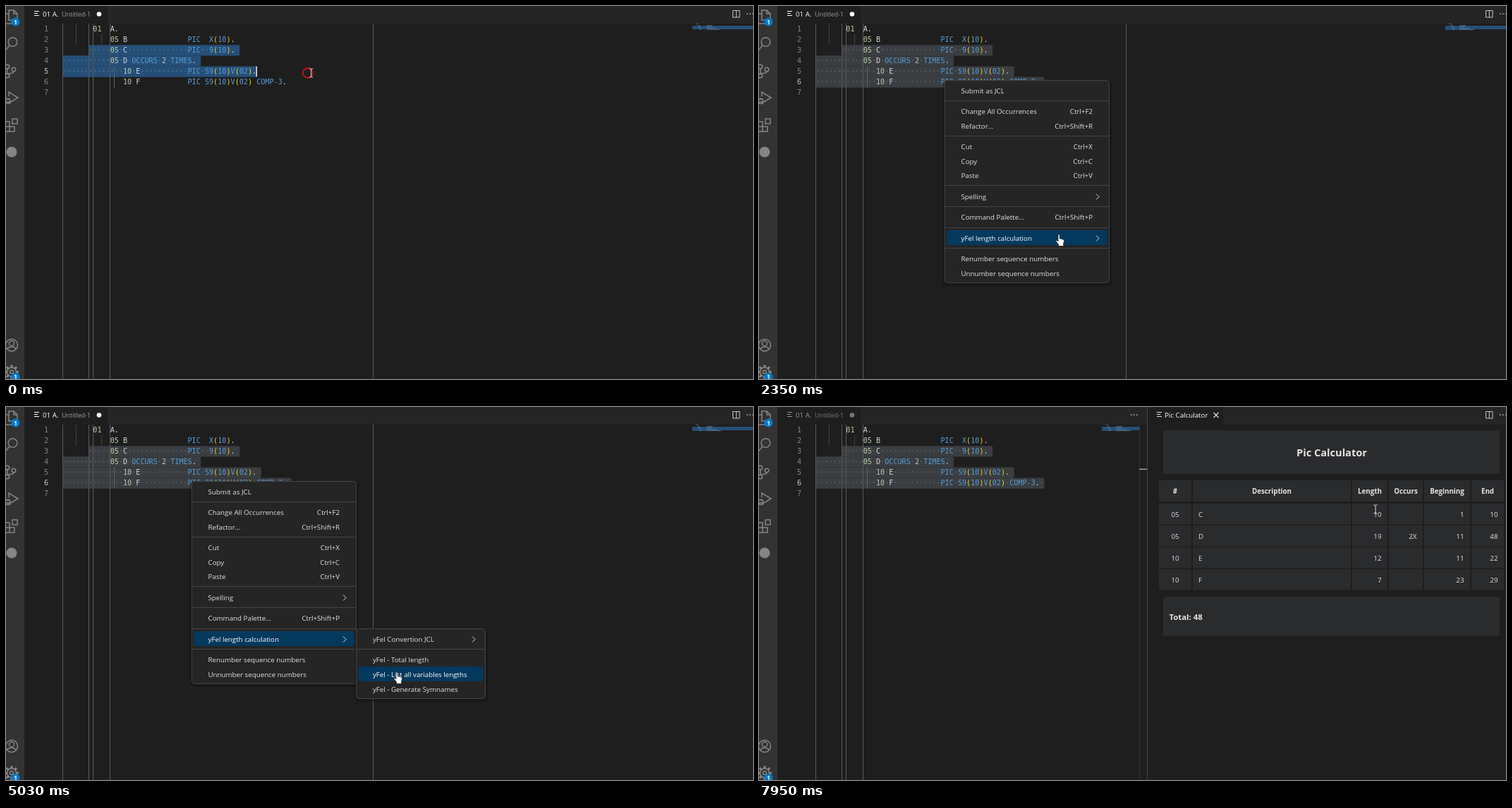
An HTML page for the animation above (8 s loop, 1059 by 529 pixels).

```html
<!DOCTYPE html>
<html lang="en">
<head>
<meta charset="utf-8">
<title>Editor length calculation</title>
<style>
html, body { margin: 0; width: 100%; height: 100%; overflow: hidden; background: #1e1e1e; }
svg { display: block; width: 100%; height: 100%; }
text { font: 9.75px "Open Sans", "Noto Sans", sans-serif; fill: #e2e2e2; white-space: pre; }
.code { font: 10.15px "DejaVu Sans Mono", monospace; fill: #d4d4d4; }
.row rect { fill: none; }
.row path { fill: none; stroke: #ddd; }
.on rect { fill: #04395e; }
.on text { fill: #fff; }
.icon { fill: none; stroke: #858585; stroke-width: 1.5; }
</style>
</head>
<body>
<svg id="stage" viewBox="0 0 1059 529"></svg>
<script>
const LOOP = 8000, X0 = 80.7, CH = 6.11, TOP = 25, LH = 15.1;
const stage = document.getElementById('stage');
const $ = id => document.getElementById(id);
const col = c => X0 + c * CH;
const lineY = n => TOP + (n - 1) * LH;

const rect = (x, y, x2, y2, fill, rx = 0, more = '') =>
  `<rect x="${x}" y="${y}" width="${x2 - x}" height="${y2 - y}" fill="${fill}" rx="${rx}" ${more}/>`;
const text = (x, mid, s, style = '', anchor = 'start', cls = '') =>
  `<text x="${x}" y="${Math.round(mid + 3.5)}" text-anchor="${anchor}" class="${cls}" style="${style}">${s}</text>`;
const path = (d, stroke, w = 1, fill = 'none') =>
  `<path d="${d}" stroke="${stroke}" stroke-width="${w}" fill="${fill}"/>`;
const group = (id, body) => `<g id="${id}">${body}</g>`;
const vline = (x, y, y2, c) => rect(Math.floor(x), y, Math.floor(x) + 1, y2, c);

// Code
const item = (pad, head, width, rest) => ' '.repeat(pad) + head.padEnd(width) + rest;
const lines = [
  item(7, '01  A.', 0, ''),
  item(11, '05 B', 18, 'PIC  X(10).'),
  item(11, '05 C', 18, 'PIC  9(10).'),
  item(11, '05 D OCCURS 2 TIMES.', 0, ''),
  item(14, '10 E', 15, 'PIC S9(10)V(02).'),
  item(14, '10 F', 15, 'PIC S9(10)V(02) COMP-3. '),
];
const paint = s => s.replace(
  /(^ *\d\d|\b2\b)|([()])|(OCCURS|TIMES|PIC|COMP-3|S9|9|X|V|10|02)/g,
  (m, num, paren) => `<tspan fill="${num ? '#b5cea8' : paren ? '#ffd700' : '#569cd6'}">${m}</tspan>`);
const code = (x, n, s, style = '', anchor = 'start') => text(x, lineY(n) + 7.3, s, style, anchor, 'code');
const codeText = lines.map((s, i) => code(X0, i + 1, paint(s))).join('');

function selection(last, color) {
  let out = rect(col(0), lineY(4) + 3, col(1), lineY(last + 1) - 3, color);
  let dots = '';
  for (let n = 3; n <= last; n++) {
    const s = lines[n - 1], from = n === 3 ? 6 : 0;
    const end = s.length + (n < last ? 1 : 0);
    out += rect(col(from), lineY(n), col(end), lineY(n + 1) + .2, color, 2);
    const marks = s.slice(from).replace(/[^ ]/g, '\u00a0').replace(/ /g, '·');
    dots += code(col(from), n, marks, 'fill:#e3e4e2;opacity:.28');
  }
  return out + dots;
}

const numbers = [1, 2, 3, 4, 5, 6, 7].map(n =>
  `<g id="num${n}">${code(60, n, n, 'fill:inherit', 'end')}</g>`).join('');
const rulers = [0, 6, 7, 11].map(c => vline(col(c), TOP, 529, '#5a5a5a')).join('');
const guides = vline(99, TOP, lineY(3), '#404040') + vline(135, lineY(2), lineY(3), '#404040');
const blockGuide = vline(153.5, lineY(5), lineY(7), '#606060');

function minimap(x, end) {
  const speck = (dx, y, w) => rect(x + dx, y, x + dx + w, y + 1, '#8a9aa8', 0, 'opacity=".5"');
  return rect(x, 28, end, 33, '#264f78') + `<g class="mapTail">${rect(x, 33, x + 42, 34, '#264f78')}</g>` +
    speck(5, 25, 4) + speck(8, 27, 3) + speck(20, 27, 9) + speck(8, 29, 3) + speck(20, 29, 8) +
    speck(10, 31, 3) + speck(20, 31, 14) + speck(10, 33, 3) + speck(20, 33, 19);
}

// Chrome
const badge = (x, y) => `<circle cx="${x}" cy="${y}" r="6" fill="#007acc"/>` +
  text(x, y - .5, 1, 'fill:#fff;font-size:8px;font-weight:700', 'middle');
const ring = (x, y, r) => `<circle cx="${x}" cy="${y}" r="${r}"/>`;
const teeth = Array.from({ length: 8 }, (_, i) =>
  `<path d="M8 509v4" transform="rotate(${i * 45} 8 519)" stroke-width="3"/>`).join('');
const activity = rect(0, 0, 26, 529, '#333') + `<g class="icon">
  <path d="M4 6H11L16 11V20H4ZM11 6V11H16M4 11H-2V25H10V20"/>
  ${ring(9.5, 51, 6.3)}<path d="M5 56L-1 63"/>
  ${ring(2, 86, 2.8)}${ring(11, 90, 2.8)}${ring(2, 99, 2.8)}<path d="M2 89V96M11 93C11 96 6 95 3 96"/>
  <path d="M4 128V122L17 130L7 136M-1 132H6M-1 136H7M-1 139L1 137M6 139L4 137"/>${ring(2.5, 135, 3.5)}
  <path d="M-2 164H5V178H-2M-2 171H12V178H-2M9 160H16V167H9Z"/>
  ${ring(8, 481, 8.5)}${ring(8, 478.5, 3.6)}<path d="M2 487C4 482 12 482 14 487"/>
  ${ring(8, 519, 6.5)}${ring(8, 519, 2.5)}${teeth}</g>
  <circle cx="8" cy="207" r="7.5" fill="#858585"/>` + badge(13.5, 22.5) + badge(13.5, 526);

const fileIcon = (x, c) => path(`M${x} 7.5h7M${x} 10.5h5M${x} 13.5h7`, c, 1.2);
const dots = x => [0, 4, 8].map(d => rect(x + d, 10.3, x + d + 1.7, 12, '#c5c5c5', .8)).join('');
const fileTab = (c, c2, dot) => rect(26, 0, 144, 25, '#1e1e1e') + fileIcon(40, c) +
  text(52, 11.5, '01 A.', `fill:${c}`) + text(79, 11.5, 'Untitled-1', `fill:${c2};font-size:8.9px`) +
  `<circle cx="132" cy="11.5" r="3.3" fill="${dot}"/>`;
const actions = path('M1030.5 6.5h9.5v9.5h-9.5zM1035.3 6.5v9.5', '#c5c5c5') + dots(1050);

// Context menus
function menuRow(id, x, x2, mid, label, key) {
  const top = Math.round(mid - 11.5);
  const tail = key === '>' ? `<path d="M${x2 - 19} ${mid - 3.5}l4 4l-4 4"/>` :
    key ? text(x2 - 24, mid, key, '', 'end') : '';
  return `<g class="row" id="${id}${Math.round(mid)}">` +
    rect(x + 3.5, top, x2 - 3.5, top + 21, 'none', 3) + text(x + 23.7, mid, label) + tail + '</g>';
}
function menu(id, x, y, x2, y2, seps, rows) {
  return group(id,
    rect(x - 2, y, x2 + 3, y2 + 4, '#000', 6, 'opacity=".25"') +
    rect(x + .5, y + .5, x2 - .5, y2 - .5, '#252526', 4, 'stroke="#454545"') +
    seps.map(s => rect(x + 1, s, x2 - 1, s + 1, '#454545')).join('') +
    rows.map(r => menuRow(id, x, x2, ...r)).join(''));
}
const mainMenu = menu('main', 262.8, 105, 497, 393, [134, 184, 254, 284, 314, 343], [
  [120, 'Submit as JCL'],
  [149.5, 'Change All Occurrences', 'Ctrl+F2'], [170, 'Refactor...', 'Ctrl+Shift+R'],
  [199.5, 'Cut', 'Ctrl+X'], [220, 'Copy', 'Ctrl+C'], [240.5, 'Paste', 'Ctrl+V'],
  [270, 'Spelling', '>'], [299.5, 'Command Palette...', 'Ctrl+Shift+P'],
  [329, 'yFel length calculation', '>'],
  [358.5, 'Renumber sequence numbers'], [379, 'Unnumber sequence numbers'],
]);
const subMenu = menu('sub', 496.2, 314, 680, 414, [343], [
  [329, 'yFel Convertion JCL', '>'], [358.5, 'yFel - Total length'],
  [379, 'yFel - List all variables lengths'], [400, 'yFel - Generate Symnames'],
]);

// Calculator panel
const CELL = '#2a2b2d';
const cols = [[567, 613], [615, 839], [841, 891], [893, 941], [943, 1008], [1010, 1056]];
const heads = ['#', 'Description', 'Length', 'Occurs', 'Beginning', 'End'];
const data = [['05', 'C', 10, '', 1, 10], ['05', 'D', 19, '2X', 11, 48],
  ['10', 'E', 12, '', 11, 22], ['10', 'F', 7, '', 23, 29]];
const bold = 'font-weight:700;fill:#e4e4e4;font-size:';
const cellText = (v, i, mid) => {
  const [a, b] = cols[i];
  return i === 0 ? text((a + b) / 2, mid, v, '', 'middle') :
    i === 1 ? text(a + 8, mid, v) : text(b - 8.5, mid, v, '', 'end');
};
const table = cols.map(([a, b], i) =>
  rect(a, 104, b, 134, CELL) + text((a + b) / 2, 119.5, heads[i], bold + '9.75px', 'middle') +
  data.map((r, k) => {
    const mid = 152.5 + k * 31;
    return rect(a, mid - 15.5, b, mid + 14, CELL) + cellText(r[i], i, mid);
  }).join('')).join('');
const report = rect(573, 33, 1050, 95, CELL, 3) +
  text(812, 66, 'Pic Calculator', bold + '14.6px', 'middle') + table +
  rect(573, 269, 1050, 325, CELL, 3) + text(581.5, 298.6, 'Total: 48', bold + '11.35px');

const single = group('single', fileTab('#fff', '#9d9d9d', '#fff') +
  vline(520, TOP, 529, '#5a5a5a') + minimap(973, 1059));
const split = group('split', fileTab('#929292', '#777', '#777') + dots(527) + minimap(486, 539) +
  vline(539, TOP, 529, '#343434') +
  rect(539, TOP, 550, 461, '#797979', 0, 'id="slider"') + rect(539, 87.5, 550, 89, '#a0a0a0') +
  vline(550, 0, 529, '#444') + rect(551, 0, 658, 25, '#1e1e1e') + fileIcon(564, '#ddd') +
  text(575, 11.5, 'Pic Calculator', 'fill:#fff') + path('M644.5 8l7 7m0-7l-7 7', '#e0e0e0', 1.2));

// Pointers, drawn around their hot spot
const pointers =
  group('beam', path('M-2.5-6H-.7L0-5.3L.7-6H2.5M0-5.3V5.3M-2.5 6H-.7L0 5.3L.7 6H2.5', '#ddd', 1)) +
  group('arrow', path('M0 0V11.5L2.7 9L4.7 13.3L6.7 12.4L4.8 8.3H8.3Z', '#222', .7, '#fff')) +
  group('hand', path('M-1 1C-1-.5 1.3-.5 1.3 1V6L3 6.2L4.6 6.6L6.2 7.2C7.3 7.6 7.6 8.3 7.5 9.5' +
    'L6.7 13V16.5H-.2V14.5L-3.7 10C-4.5 8.4-2.8 7.8-1.8 9L-1 10Z', '#222', .8, '#fff'));

stage.innerHTML = rect(0, 0, 1059, 529, '#1e1e1e') + rect(26, 0, 1059, 25, '#252526') + activity +
  guides + group('selEarly', selection(5, '#264f78')) + group('selFocus', selection(6, '#264f78')) +
  group('selBlur', selection(6, '#3a3d41')) + rulers + blockGuide +
  numbers + codeText + rect(0, 0, 1.5, 14.5, '#e8e8e8', 0, 'id="caret"') +
  single + split + actions + group('report', report) + mainMenu + subMenu +
  '<circle id="click" r="7" fill="none" stroke="#c8101a" stroke-width="1.8"/>' + group('mouse', pointers);

// Stepped timelines: each entry holds until the next
const moves = [
  [0, 'beam', 432.5, 95], [150, 'beam', 460, 104], [300, 'beam', 471, 105], [690, 'beam', 462, 105],
  [830, 'beam', 415, 106], [960, 'beam', 320, 106], [1090, 'beam', 265, 105],
  [1800, 'arrow', 263, 104], [2080, 'hand', 345, 197], [2220, 'hand', 400, 268],
  [2350, 'hand', 425, 324], [2470, 'hand', 426, 327], [3020, 'hand', 455, 331],
  [3150, 'hand', 492, 336], [3290, 'hand', 513, 337], [3420, 'hand', 534, 340],
  [3570, 'hand', 547, 344], [3710, 'hand', 565, 364], [3840, 'hand', 570, 371],
  [4100, 'hand', 573, 370], [4900, 'hand', 562, 374], [5030, 'hand', 554, 376],
  [5570, 'beam', 554, 377], [5690, 'none', 554, 377], [6080, 'arrow', 554, 377],
  [7560, 'arrow', 592, 346], [7690, 'arrow', 700, 252], [7820, 'arrow', 815, 178],
  [7950, 'beam', 874, 145],
];
const mainPicks = [[0, ''], [2080, 'main170'], [2220, 'main270'], [2350, 'main329']];
const subPicks = [[0, ''], [3290, 'sub329'], [3710, 'sub359'], [3840, 'sub379']];
const current = (list, t) => list.findLast(e => e[0] <= t);
const show = (id, yes) => $(id).setAttribute('visibility', yes ? 'visible' : 'hidden');
const rows = [...document.querySelectorAll('.row')];
const tails = [...document.querySelectorAll('.mapTail')];

function draw(t) {
  const between = (a, b) => t >= a && t < b;
  const early = t < 150, panel = t >= 5690;
  const focused = between(150, 1650) || between(5570, 5690);

  show('selEarly', early);
  show('selFocus', focused);
  show('selBlur', !early && !focused);
  for (let n = 1; n <= 7; n++) {
    $('num' + n).setAttribute('fill', n === (early ? 5 : 6) ? '#c6c6c6' : '#858585');
  }
  tails.forEach(e => e.setAttribute('opacity', early ? 0 : 1));
  show('caret', early || (focused && !between(570, 1090)));
  $('caret').setAttribute('transform', `translate(${early ? 354.5 : 403.5} ${lineY(early ? 5 : 6) + .3})`);

  $('single').setAttribute('display', panel ? 'none' : 'inline');
  $('split').setAttribute('display', panel ? 'inline' : 'none');
  $('slider').setAttribute('opacity', .2 * Math.min(1, Math.max(0, (7100 - t) / 800)));
  show('report', t >= 6080);

  $('main').setAttribute('display', between(1800, 5570) ? 'inline' : 'none');
  $('sub').setAttribute('display', between(2620, 5570) ? 'inline' : 'none');
  const picks = [current(mainPicks, t)[1], current(subPicks, t)[1]];
  rows.forEach(r => r.classList.toggle('on', picks.includes(r.id)));

  const [, kind, x, y] = current(moves, t);
  for (const k of ['beam', 'arrow', 'hand']) show(k, k === kind);
  $('mouse').setAttribute('transform', `translate(${x} ${y})`);
  show('click', t < 300 || between(1650, 1800));
  $('click').setAttribute('cx', x - (t < 300 ? 4.5 : 2));
  $('click').setAttribute('cy', y);
}

const start = performance.now();
function tick() {
  draw((performance.now() - start) % LOOP);
  requestAnimationFrame(tick);
}
tick();
</script>
</body>
</html>
```
